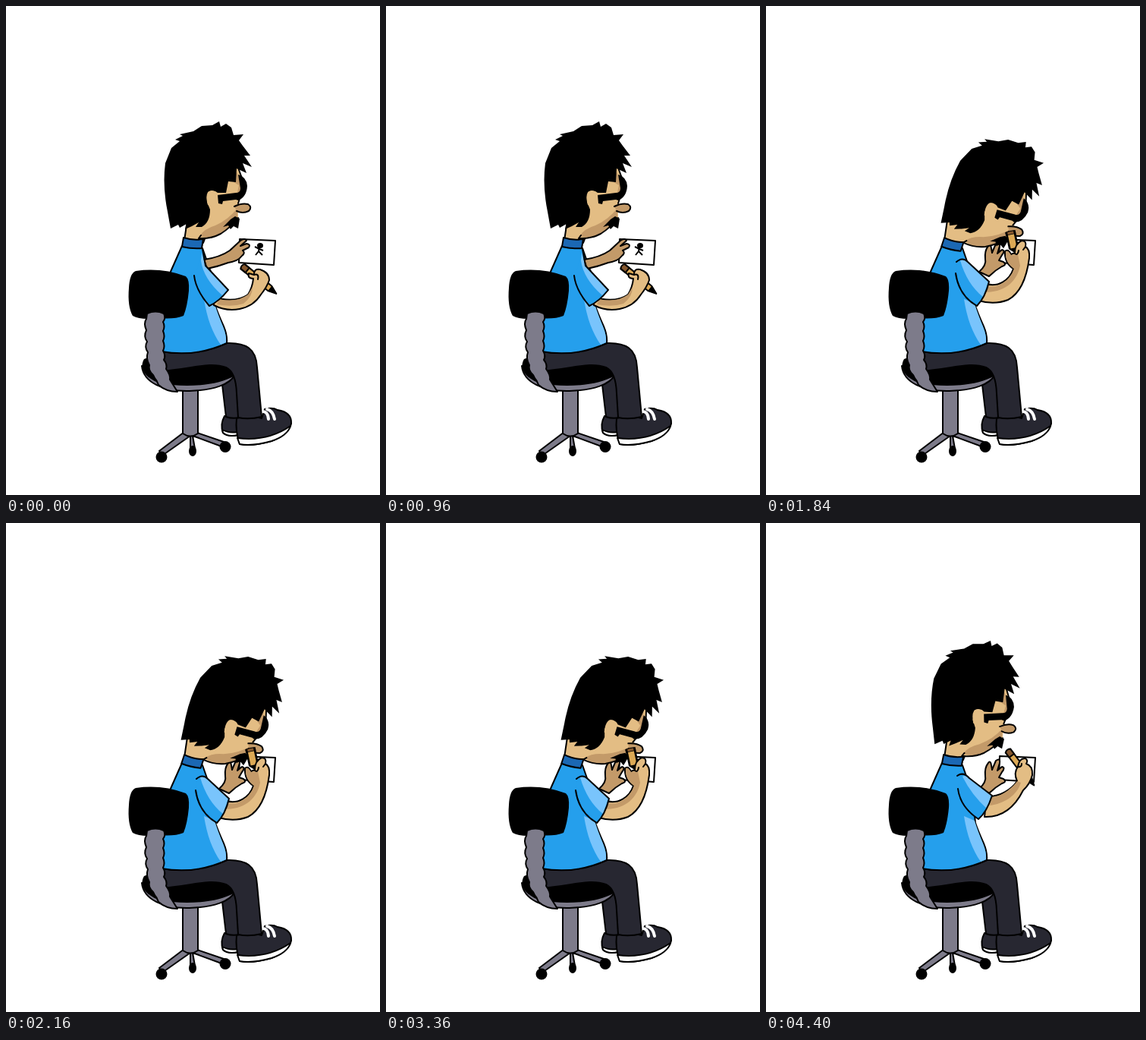
Animation, 493 px wide and 644 px high, one loop 4.56 s. Source, as an HTML page:

```html
<!DOCTYPE html>
<html lang="en">
<head>
<meta charset="utf-8">
<title>Drawing at the chair</title>
<style>
  html, body { margin: 0; width: 100%; height: 100%; overflow: hidden; background: #fff; }
  svg { display: block; width: 100vw; height: 100vh; }
  .ink { stroke: #000; stroke-width: 2; stroke-linejoin: round; stroke-linecap: round; }
  .line { fill: none; }
  .skin { fill: #e3bd84; }
  .shade { fill: #c39a69; }
  .shirt { fill: #259fec; }
  .light { fill: #79c4fc; }
  .cloth { fill: #272731; }
  .metal { fill: #7d7b8a; }
  .white { fill: #fff; }
</style>
</head>
<body>
<svg viewBox="0 0 493 644">
  <!-- chair base -->
  <g class="ink metal">
    <path d="M235 561 L202 586 L206 592 L243 566 L243 583 L249 583 L246 566 L284 580 L287 574 L252 562Z"/>
    <path d="M233 503 L233 563 Q243 570 253 563 L253 503Z"/>
  </g>
  <circle cx="205" cy="594" r="7.5"/>
  <ellipse cx="246" cy="586" rx="5" ry="7"/>
  <circle cx="289" cy="580.5" r="7.5"/>

  <!-- far leg and shoe -->
  <path class="ink cloth" d="M288 540 Q282 551 286 562 Q295 568 306 565 L306 541Z"/>
  <path class="ink white" d="M285 558 Q294 563 305 561 L306 565 Q292 568 286 562Z"/>
  <path class="ink cloth" d="M284 490 L290 541 Q298 544 308 542 L304 485Z"/>

  <!-- seat -->
  <path class="ink metal" d="M179 474 C181 496 208 508 242 507 C274 506 296 498 301 486Z"/>
  <path d="M182 465 C176 476 180 487 200 496 C235 504 280 500 301 487 L290 470 L215 452Z"/>

  <!-- near leg and shoe -->
  <path class="ink cloth" d="M304 543 Q321 537 337 543 L341 531 Q351 528 358 532 Q377 535 376 550 Q373 564 350 573 Q325 580 308 577 Q302 560 304 543Z"/>
  <path class="ink white" d="M305 569 Q345 574 375 553 Q371 566 350 573 Q325 580 308 577Z"/>
  <path d="M337 534 Q345 533 346 544 M344 531 Q352 533 354 544" fill="none" stroke="#fff" stroke-width="4" stroke-linecap="round"/>
  <path class="ink cloth" d="M203 455 Q250 462 291 444 C316 443 330 451 331 476 L337 541 Q320 545 306 542 L304 510 Q303 482 290 476 C268 468 246 478 203 481Z"/>

  <!-- body -->
  <path class="ink skin" d="M235 309 L239 282 L270 286 L260 312Z"/>
  <path class="ink shirt" d="M232 316 L259 319 L272 356 L276 395 Q279 404 287 422 Q292 434 291 444 Q250 463 205 455 L205 410 L216 352Z"/>
  <path class="light" d="M261 386 L275 392 Q279 405 286 422 Q291 434 290 443 L283 446 C272 430 265 412 261 386Z"/>

  <g id="paper">
    <path class="ink white" d="M308 307 L355 309 L353 341 L307 338Z"/>
    <g id="doodle">
      <ellipse cx="335" cy="315.500" rx="4" ry="3.500"/>
      <path d="M334 317 L333 323 M328 317 L334 320 L339 322 M329 328 L333 323 L338 328" fill="none" stroke="#000" stroke-width="2"/>
    </g>
  </g>
  <path id="farArm" class="ink shade"/>

  <!-- head -->
  <g id="head">
    <path class="skin" d="M240 284 L238 300 Q262 311 283 300 Q297 291 306 279 L306 272 L320 270 Q325 264 318 261 L306 260 L314 235 L306 213 L270 215 L248 270Z"/>
    <path class="shade" d="M305 266 Q294 281 276 289 Q262 293 255 303 Q271 308 283 299 Q297 290 305 279Z"/>
    <path class="shade" d="M302 260 L305 248 L312 240 L304 218 L300 232 L307 236Z"/>
    <path class="ink line" d="M257 302 L254 306 Q270 307 283 300 Q297 291 306 279 M306 260 L314 235 L306 213"/>
    <path d="M296 281 L286 291 L293 289 L296 294 L300 290 L306 293 L308 280 L302 277Z"/>
    <path class="ink shade" d="M301 264 Q311 259 319 261 Q325 265 320 270 Q312 274 304 270"/>
    <path d="M217 293 L213 271 Q206 237 210 207 L218 187 L229 178 L223 176 L233 171 L229 169 L247 165 L258 158 L272 157 L281 152 L283 159 L290 155 L297 160 L300 170 L313 169 L307 177 L312 184 L322 197 L314 197 L324 212 L312 207 L317 220 L304 214 L303 232 L293 231 L290 246 L279 246 Q274 241 266 245 L265 258 L269 268 Q269 285 258 291 L250 291 L254 285 L245 290 L236 294 L238 287 L229 292 L227 288Z"/>
    <path class="skin" d="M266 262 Q261 244 271 243 Q280 244 280 253 Q280 261 273 264Z"/>
    <path d="M279 249 L303 246 Q309 246 309 240 L306 222 Q317 225 318 237 Q317 252 306 256 L303 255 L286 257 L285 261 L280 260Z"/>
  </g>
  <path class="ink" fill="#1b68b4" d="M234 305 Q246 309 260 307 L258 319 Q245 320 232 317Z" id="collar"/>

  <!-- near arm -->
  <g id="pencil">
    <path class="ink" fill="#dca955" d="M0 -4 H46 L57 0 L46 4 H0Z"/>
    <path class="ink" fill="#85582f" d="M0 -4 Q-3 0 0 4 H8 V-4Z"/>
    <path d="M46 -4 L58 0 L46 4Z"/>
  </g>
  <path id="arm" class="ink skin"/>
  <path id="armShade" class="shade"/>
  <path id="knuckles" class="ink line"/>
  <path id="sleeve" class="shirt"/>
  <path id="sleeveLight" class="light"/>
  <path id="sleeveLine" class="ink line"/>

  <!-- chair back -->
  <path d="M171 349 Q205 344 237 356 Q242 360 241 375 Q239 396 234 408 Q222 413 200 411 Q178 414 167 408 Q160 396 162 371 Q163 352 171 349Z"/>
  <path class="ink metal" d="M186 405 Q197 400 208 405 Q211 411 207 416 Q210 422 207 428 Q210 435 207 441 Q210 448 207 454 Q211 461 208 466 Q213 472 211 478 Q217 486 216 492 L226 508 Q211 508 201 499 Q199 493 196 490 L194 486 Q187 480 189 473 Q184 464 187 456 Q182 449 186 442 Q181 435 185 427 Q181 418 185 412Z"/>
</svg>
<script>
const LOOP = 4560;
const el = id => document.getElementById(id);

const spread = "M281 350 Q291 341 289 333 Q288 322 293 316 Q296 312 297 319 L298 325 L303 313 Q309 309 308 316 L305 326 L311 321 Q316 322 311 328 L307 335 L313 337 Q318 341 311 343 Q302 348 294 356Z";
const bentSleeve = {
  far: spread,
  sleeve: "M251 345 Q250 332 262 333 L274 344 L294 363 Q288 385 278 395 Q254 380 251 345Z",
  light: "M256 335 Q261 332 265 337 L293 363 L286 383 C272 372 262 356 256 335Z",
  seam: "M251 337 Q259 330 266 337 L294 363 Q289 384 278 395 Q254 381 250 352"
};
const drawArm = {
  ...bentSleeve,
  arm: "M285 364 C306 374 322 359 326 346 Q314 338 315 323 Q319 319 323 327 L328 325 Q328 313 337 309 Q344 309 342 317 Q348 320 347 332 C344 355 336 378 319 387 Q301 394 280 388Z",
  shade: "M292 369 C308 373 323 359 327 346 Q315 338 316 324 Q319 321 323 328 L332 327 L335 342 C330 366 312 377 288 377Z",
  knuckles: "M328 326 Q332 329 333 322 M342 317 L339 321"
};
const poses = {
  look: {
    far: "M261 334 Q282 331 295 322 L309 309 Q315 305 317 309 L309 316 L317 313 Q323 314 320 318 L312 322 Q316 325 311 329 Q306 336 293 338 Q280 343 265 346Z",
    sleeve: "M249 356 L258 325 L262 341 L293 374 Q280 390 268 395 Q251 374 249 356Z",
    light: "M258 325 L263 342 L292 373 L285 381 Q260 359 257 335Z",
    seam: "M259 320 L263 342 L293 374 Q281 389 268 395 Q250 374 248 355",
    arm: "M272 383 Q302 392 319 380 Q325 370 326 359 Q318 359 320 352 L327 354 Q327 345 335 347 Q347 351 347 361 Q344 370 336 380 C323 401 295 405 274 394Z",
    shade: "M281 386 Q304 391 319 380 L325 370 Q325 383 313 392 Q298 397 278 393Z",
    knuckles: "M327 354 Q334 352 332 360",
    pencil: [312, 343, 39, 1, 1]
  },
  lift: {
    far: spread,
    sleeve: "M254 347 Q252 330 264 332 L275 342 L298 359 Q292 380 280 390 Q257 374 254 347Z",
    light: "M259 334 Q263 331 269 337 L297 359 L291 376 Q271 358 259 334Z",
    seam: "M252 333 Q260 327 268 336 L298 359 Q291 381 280 390 Q256 374 253 350",
    arm: "M291 360 C309 361 324 350 331 340 Q326 329 332 321 Q334 309 342 310 Q346 313 343 317 Q352 320 351 332 Q348 344 339 352 C329 372 313 388 288 387Z",
    shade: "M298 361 C309 361 324 350 331 340 L336 342 C331 359 313 370 295 372Z",
    knuckles: "M332 321 Q337 322 337 317",
    pencil: [319, 300, 53, 1, 1]
  },
  drawUp: { ...drawArm, pencil: [322, 297, 78, 0.48, 1.35] },
  drawMid: { ...drawArm, pencil: [317, 302, 56, 0.46, 1.25] },
  drawLow: {
    ...drawArm,
    arm: "M285 364 C309 370 325 357 328 344 Q317 336 325 327 L331 323 Q325 310 335 309 Q342 310 341 317 Q353 318 353 334 C348 358 336 379 319 388 Q301 395 280 389Z",
    shade: "M292 368 C309 370 325 357 328 344 L335 342 C330 366 312 377 288 377Z",
    knuckles: "M331 323 Q336 326 335 318",
    pencil: [312, 311, 27, 0.46, 1]
  }
};
const drawCycle = [poses.drawUp, poses.drawMid, poses.drawLow];
const twirl = [0, 4, -4];
const restHead = [0, 0, 0], liftHead = [8, 2, 4], lowHead = [25, 16, 22];

const mix = (a, b, u) => a.map((v, i) => v + (b[i] - v) * u);

// Drawn frames come in groups of four; the last of each group is held twice as long.
function frameAt(t) {
  if (t < 160) return 0;
  const s = t - 160;
  return 1 + 4 * Math.floor(s / 400) + Math.min(3, Math.floor(s % 400 / 80));
}

function stateAt(k) {
  if (k < 13) return { pose: poses.look, head: restHead, turn: twirl[k % 3] };
  if (k === 13) return { pose: poses.lift, head: mix(liftHead, lowHead, 0.5), turn: 0 };
  if (k < 43) return { pose: drawCycle[k % 3], head: lowHead, turn: 0 };
  return { pose: poses.lift, head: k === 43 ? mix(lowHead, liftHead, 0.5) : liftHead, turn: 0 };
}

function render(t) {
  const { pose, head: [x, y, angle], turn } = stateAt(frameAt(t));
  const setPath = (id, d) => el(id).setAttribute("d", d);
  setPath("farArm", pose.far);
  setPath("arm", pose.arm);
  setPath("armShade", pose.shade);
  setPath("knuckles", pose.knuckles);
  setPath("sleeve", pose.sleeve);
  setPath("sleeveLight", pose.light);
  setPath("sleeveLine", pose.seam);
  const [px, py, tilt, length, width] = pose.pencil;
  el("pencil").setAttribute("transform",
    `rotate(${turn} 334 360) translate(${px} ${py}) rotate(${tilt}) scale(${length} ${width})`);
  el("head").setAttribute("transform", `translate(${x} ${y}) rotate(${angle} 271 252)`);
  el("collar").setAttribute("transform", `rotate(${angle * 0.4} 233 312)`);
  el("doodle").style.display = pose === poses.look ? "" : "none";
}

const start = performance.now();
function tick() {
  render((performance.now() - start) % LOOP);
  requestAnimationFrame(tick);
}
tick();
</script>
</body>
</html>
```
